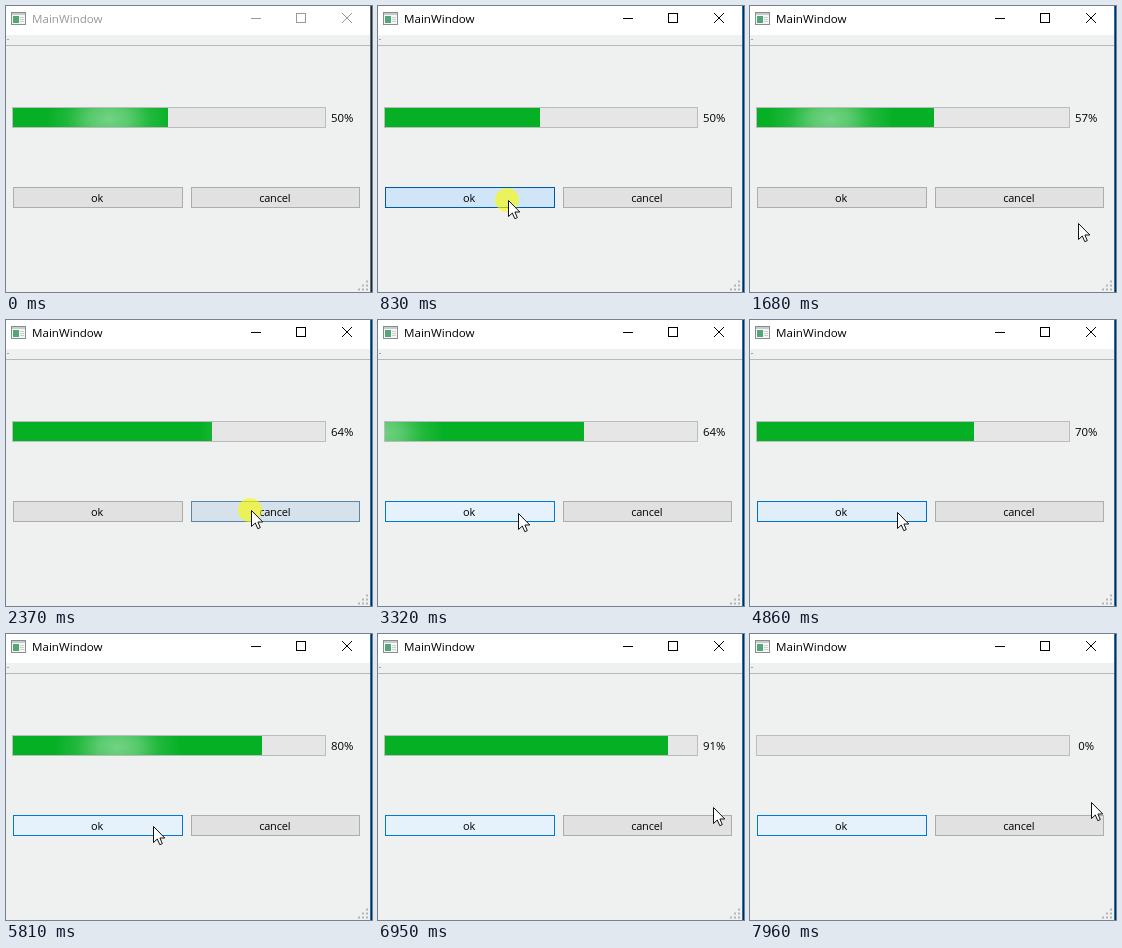
Recreate the animation shown at these times as an HTML page. Size 366 by 286 pixels, loop 8 s.

```html
<!DOCTYPE html>
<html lang="en">
<head>
<meta charset="utf-8">
<title>MainWindow</title>
<style>
  html, body { margin: 0; width: 100%; height: 100%; overflow: hidden; background: #eff1f0; }
  svg { display: block; }
  text { font: 11.4px "Open Sans", "Noto Sans", sans-serif; }
  .label { font-size: 11px; letter-spacing: -.2px; text-anchor: middle; }
  .caption { font-size: 11.6px; }
  .anim { animation: 8s linear infinite; }
  .button { fill: #e1e1e1; stroke: #adadad; }

  #caption { animation-name: caption; animation-timing-function: step-end; }
  #controls { animation-name: controls; animation-timing-function: step-end; }
  #edge { animation-name: edge; animation-timing-function: step-end; }
  #ok { animation-name: ok; }
  #cancel { animation-name: cancel; }
  #glare { animation-name: glare; }
  #pointer { animation-name: pointer; animation-timing-function: ease-in-out; }
  #click { animation-name: click; animation-timing-function: step-end; }

  @keyframes caption { 0% { fill: #999 } 9.875%, 100% { fill: #000 } }
  @keyframes controls { 0% { stroke: #999 } 9.875%, 100% { stroke: #000 } }
  @keyframes edge { 0% { fill: #6b6f73 } 9.875%, 100% { fill: #0078d7 } }

  @keyframes ok {
    0%, 6%, 15%, 38.5%, 100% { fill: #e1e1e1; stroke: #adadad }
    7.5%, 9.8%, 12%, 40%, 41.5%, 44%, 58.8%, 61%, 99.99% { fill: #e5f1fb; stroke: #0078d7 }
    10.5%, 42.5%, 59.8% { fill: #cce4f7; stroke: #005499 }
  }
  @keyframes cancel {
    0%, 24%, 33%, 49%, 56%, 82%, 86%, 100% { fill: #e1e1e1; stroke: #adadad }
    26%, 28.6%, 50%, 52%, 83%, 84.5% { fill: #e5f1fb; stroke: #0078d7 }
    29.625% { fill: #d5e2ec; stroke: #5b87a3 }
    30.5%, 51% { fill: #cce4f7; stroke: #005499 }
  }
  @keyframes glare {
    0% { transform: translateX(103px) }
    13.75% { transform: translateX(382px) }
    13.86%, 38.15%, 63.96%, 88.36% { transform: translateX(-65px) }
    38.14% { transform: translateX(429px) }
    63.95% { transform: translateX(460px) }
    88.35% { transform: translateX(431px) }
    100% { transform: translateX(171px) }
  }
  @keyframes pointer {
    0%, 1.25% { transform: translate(250px, 290px) }
    7.5%, 11.25% { transform: translate(130px, 194px) }
    18.75% { transform: translate(328px, 222px) }
    21%, 22.5% { transform: translate(328px, 217px) }
    28.125%, 30.625% { transform: translate(245px, 190px) }
    32.625% { transform: translate(205px, 208px) }
    33.625%, 37.625% { transform: translate(160px, 210px) }
    40.625%, 43.125% { transform: translate(140px, 193px) }
    48.125%, 51.25% { transform: translate(264px, 189px) }
    57.5% { transform: translate(147px, 189px) }
    58.75%, 79.625% { transform: translate(147px, 192px) }
    86.875%, 90.875% { transform: translate(335px, 173px) }
    93.75%, 100% { transform: translate(341px, 168px) }
  }
  @keyframes click {
    0%, 10.875%, 30.5%, 42.75%, 50.75%, 60%, 100% { opacity: 0 }
    9.875%, 28.75%, 41.6%, 50%, 59% { opacity: 1 }
  }
</style>
</head>
<body>
<svg width="366" height="286" viewBox="0 0 366 286">
  <defs>
    <radialGradient id="shine">
      <stop offset="0" stop-color="#fff" stop-opacity=".44"/>
      <stop offset=".3" stop-color="#fff" stop-opacity=".34"/>
      <stop offset=".65" stop-color="#fff" stop-opacity=".11"/>
      <stop offset="1" stop-color="#fff" stop-opacity="0"/>
    </radialGradient>
    <clipPath id="filled"><rect id="extent" x="7" y="102" height="19"/></clipPath>
  </defs>

  <rect width="366" height="286" fill="#eff1f0"/>
  <rect width="364" height="29" fill="#fff"/>
  <path d="M0 39.5H364" stroke="#b5b9b9"/>
  <path d="M1 33.5H3" stroke="#a0a4a4"/>

  <!-- window icon -->
  <rect x="5.5" y="6.5" width="14" height="12" fill="#f4f7f6" stroke="#868e8e"/>
  <path d="M6 8H19" stroke="#c4cccc" stroke-width="2"/>
  <rect x="7" y="10" width="6" height="7" fill="#55a578"/>
  <path d="M14 11.5H18M14 13.5H18M14 15.5H18" stroke="#c9d0ce"/>

  <text id="caption" class="anim caption" x="26" y="17">MainWindow</text>
  <g id="controls" class="anim" fill="none">
    <path d="M245 12.5H255"/>
    <rect x="290.5" y="7.5" width="9" height="9"/>
    <path d="M336 7L346 17M346 7L336 17"/>
  </g>

  <!-- progress bar -->
  <rect x="6.5" y="101.5" width="313" height="20" fill="#e6e6e6" stroke="#bcbcbc"/>
  <g clip-path="url(#filled)">
    <rect x="7" y="102" width="312" height="19" fill="#06b025"/>
    <ellipse id="glare" class="anim" cy="113" rx="64" ry="42" fill="url(#shine)"/>
  </g>
  <path id="start" d="M6.5 102V121" stroke="#06b025"/>
  <text id="percent" x="336.3" y="116" text-anchor="middle">50%</text>

  <rect id="ok" class="anim button" x="7.5" y="181.5" width="169" height="20"/>
  <text class="label" x="91" y="196">ok</text>
  <rect id="cancel" class="anim button" x="185.5" y="181.5" width="168" height="20"/>
  <text class="label" x="268.7" y="196">cancel</text>

  <path d="M360 277H362M356 281H358M360 281H362M352 285H354M356 285H358M360 285H362"
        transform="translate(0 -1.5)" stroke="#b4b6b6" stroke-width="2"/>
  <rect id="edge" class="anim" x="364" width="1" height="286"/>
  <rect x="365" width="1" height="286" fill="#1d2733"/>

  <g id="pointer" class="anim">
    <circle id="click" class="anim" cx="-1" r="12" fill="#fafa00" fill-opacity=".62"/>
    <path d="M.5 .5V16.5L4.3 13L6.8 18.7L9.3 17.6L6.9 12H11.8Z" fill="#fff" stroke="#111"/>
  </g>
</svg>
<script>
  const byId = id => document.getElementById(id);
  const clock = byId("pointer").getAnimations()[0];
  const STEP = 100;
  // Each run of the timer: begin, end (ms) and the value it begins with.
  const runs = [[875, 2374, 50], [3380, 4050, 64], [4760, 8000, 70]];

  function valueAt(time) {
    let value = 50;
    for (const [begin, end, first] of runs) {
      if (time >= begin) value = first + Math.floor((Math.min(time, end) - begin) / STEP);
    }
    return value % 101;
  }

  function draw() {
    const value = valueAt((clock.currentTime || 0) % 8000);
    byId("extent").setAttribute("width", Math.max(0, Math.round(3.12 * value - 1.1)));
    byId("start").setAttribute("opacity", value > 0 && value < 5 ? 1 : 0);
    byId("percent").textContent = value + "%";
    requestAnimationFrame(draw);
  }
  draw();
</script>
</body>
</html>
```
